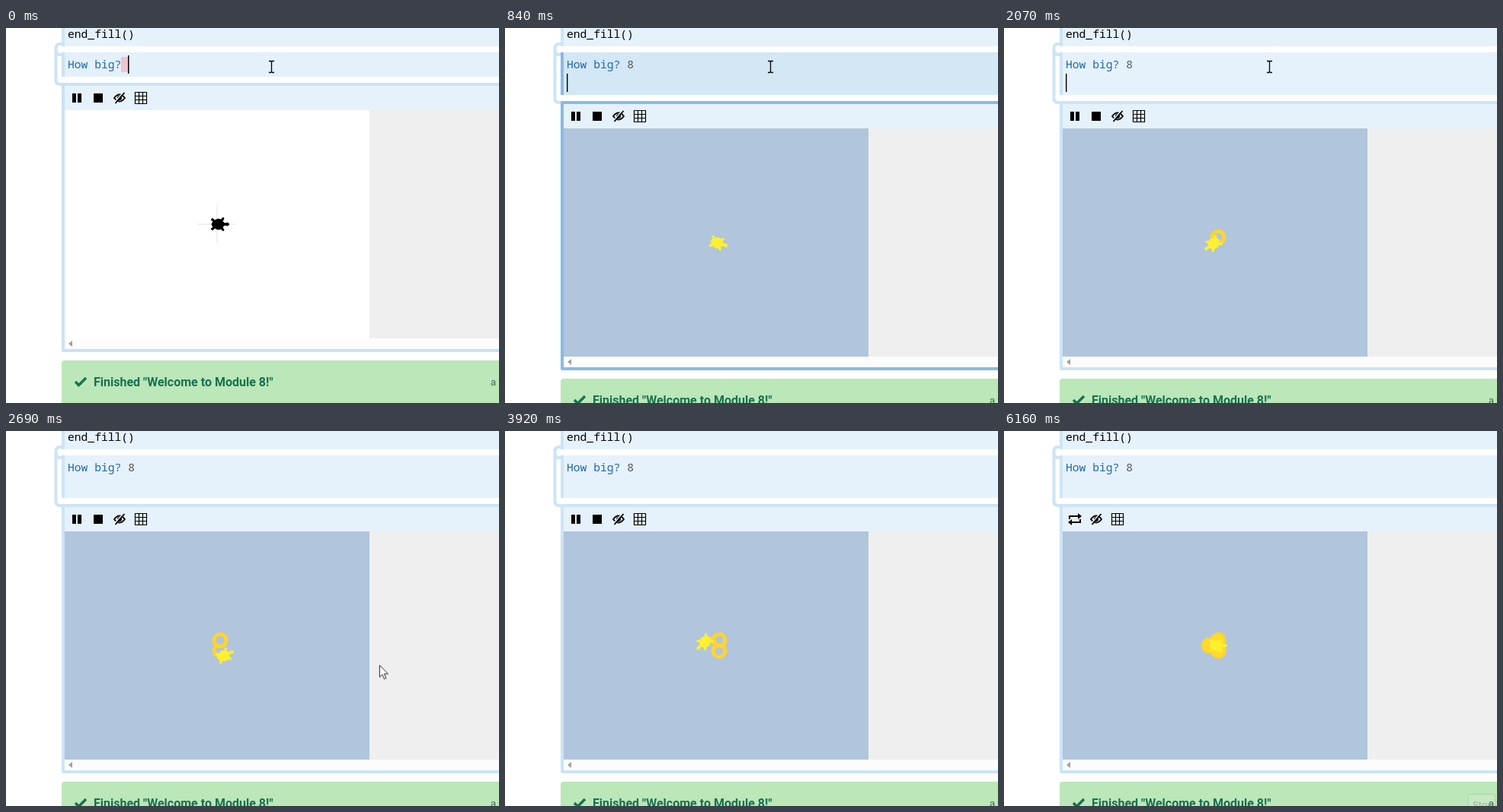
An HTML page that plays this animation: 647x493 px, repeating every 6230 ms.

```html
<!DOCTYPE html>
<html lang="en">
<head>
<meta charset="utf-8">
<title>Turtle flower</title>
<style>
html, body { margin: 0; width: 100%; height: 100%; overflow: hidden; background: #fff; }
svg { display: block; }
svg * { animation-duration: 6230ms; animation-iteration-count: infinite; animation-timing-function: linear; }
.mono { font: 14.65px "Noto Sans Mono", "DejaVu Sans Mono", monospace; }
.title { font: 700 16px Roboto, sans-serif; fill: #17714f; }
.small { font: 13px Roboto, sans-serif; fill: #3d6b50; }
.light { stroke: #cce4f6; stroke-width: 4; fill: none; }
.line { stroke: #000; fill: none; }

/* waiting-for-input pulse */
.field { fill: #e6f2fb; animation-name: field; animation-timing-function: ease-in-out; }
.edge { color: #cce4f6; animation-name: edge; animation-timing-function: ease-in-out; }
@keyframes field {
  0% { fill: #e4f0fa; } 1.93% { fill: #e6f2fb; }
  17.98% { fill: #cfe5f4; } 34.03%, 100% { fill: #e6f2fb; }
}
@keyframes edge {
  0% { color: #c9e2f5; } 1.93% { color: #cce4f6; }
  17.98% { color: #7ab2e5; } 34.03%, 100% { color: #cce4f6; }
}

/* hard switches */
.step { animation-timing-function: step-end; }
.space { animation-name: space; }
.caret1 { animation-name: caret1; }
.caret2 { animation-name: caret2; }
.digit { animation-name: digit; }
.lower { animation-name: drop; }
.sky { animation-name: sky; }
.skin { animation-name: skin; }
.cross { animation-name: cross; }
.fill { animation-name: filled; }
.run { animation-name: run; }
.again { animation-name: again; }
.tools { animation-name: tools; }
.beam { animation-name: beam; }
.arrow { animation-name: arrow; }
.tip { animation-name: tip; }
@keyframes space { 0% { opacity: 1; } 4.49%, 100% { opacity: 0; } }
@keyframes caret1 {
  0% { opacity: 1; transform: none; } 1.69% { opacity: 0; transform: none; }
  4.49% { opacity: 1; transform: translateX(9px); } 8.99%, 100% { opacity: 0; }
}
@keyframes caret2 {
  0% { opacity: 0; } 8.99% { opacity: 1; } 17.5% { opacity: 0; }
  26% { opacity: 1; } 33.6%, 100% { opacity: 0; }
}
@keyframes digit { 0% { opacity: 0; } 4.49%, 100% { opacity: 1; } }
@keyframes drop { 0% { transform: none; } 8.99%, 100% { transform: translateY(24px); } }
@keyframes sky { 0% { fill: #fff; } 13.32%, 100% { fill: #b1c5dd; } }
@keyframes skin { 0% { color: #000; } 13.32%, 100% { color: #fff02e; } }
@keyframes cross { 0% { opacity: 1; } 13.32%, 100% { opacity: 0; } }
@keyframes filled { 0% { opacity: 0; } 78.65%, 100% { opacity: 1; } }
@keyframes run { 0% { opacity: 1; } 79.78%, 100% { opacity: 0; } }
@keyframes again { 0% { opacity: 0; } 79.78%, 100% { opacity: 1; } }
@keyframes tools { 0% { transform: none; } 79.78%, 100% { transform: translateX(-28px); } }
@keyframes beam { 0% { opacity: 1; } 39.8%, 100% { opacity: 0; } }
@keyframes arrow { 0% { opacity: 0; } 39.8% { opacity: 1; } 51.4%, 100% { opacity: 0; } }
@keyframes tip { 0% { opacity: 0; } 97.75% { opacity: .5; } 98.7%, 100% { opacity: 1; } }

/* pointer path */
.pointer { animation-name: pointer; }
@keyframes pointer {
  0%, 39.8% { transform: translate(348px, 50px); }
  41.1% { transform: translate(418px, 169px); }
  42.2% { transform: translate(441px, 265px); }
  43.3% { transform: translate(495px, 312px); }
  45.4% { transform: translate(548px, 333px); }
  47.67% { transform: translate(569px, 372px); }
  49.76% { transform: translate(596px, 455px); }
  51.4%, 100% { transform: translate(625px, 500px); }
}

/* three circles of radius 8, each starting at home */
.trail { stroke: #ffd52d; stroke-width: 5; fill: none; stroke-dasharray: 1 2; stroke-dashoffset: 1; }
.c1 { animation-name: c1; }
.c2 { animation-name: c2; }
.c3 { animation-name: c3; }
@keyframes c1 {
  0%, 13.64% { stroke-dashoffset: 1; } 21.19% { stroke-dashoffset: .44; }
  30.34%, 100% { stroke-dashoffset: 0; }
}
@keyframes c2 { 0%, 32.91% { stroke-dashoffset: 1; } 54%, 100% { stroke-dashoffset: 0; } }
@keyframes c3 { 0%, 55.22% { stroke-dashoffset: 1; } 76.08%, 100% { stroke-dashoffset: 0; } }

.turn { animation-name: turn; }
.orbit { animation-name: orbit; transform-origin: 0 -8px; }
@keyframes turn {
  0%, 13.32% { transform: rotate(0deg); }
  13.64%, 30.34% { transform: rotate(30deg); }
  32.91%, 54% { transform: rotate(150deg); }
  55.22%, 76.08% { transform: rotate(270deg); }
  78.33%, 100% { transform: rotate(360deg); }
}
@keyframes orbit {
  0%, 13.64% { transform: rotate(0deg); }
  21.19% { transform: rotate(-201.6deg); }
  30.34% { transform: rotate(-360deg); }
  30.341%, 32.91% { transform: rotate(0deg); }
  54% { transform: rotate(-360deg); }
  54.001%, 55.22% { transform: rotate(0deg); }
  76.08% { transform: rotate(-360deg); }
  76.081%, 100% { transform: rotate(0deg); }
}
</style>
</head>
<body>
<svg width="647" height="493" viewBox="0 0 647 493">
  <defs>
    <path id="ring" pathLength="1" d="M0 0A8 8 0 0 0 0 -16A8 8 0 0 0 0 0"/>
    <circle id="disc" cy="-8" r="8"/>
  </defs>

  <!-- code cell and input -->
  <path fill="#e6f2fb" d="M77 0H647V24H77z"/>
  <path fill="#cce4f6" d="M73 0h4v24h-4z"/>
  <path class="light" d="M73 21H71Q65.500 21 65.500 27V88M73 35H71Q66 35 65.500 29"/>
  <path class="field" d="M77 32H647V88H77z"/>
  <g class="edge"><path fill="currentColor" d="M73 32h4v56h-4z"/></g>
  <text class="mono" x="81" y="13">end_fill()</text>
  <path class="step space" fill="#edc6cf" d="M151 38h9v20h-9z"/>
  <text class="mono" x="81" y="53" fill="#1f68a8">How big?</text>
  <text class="mono step digit" x="160.200" y="53" fill="#555">8</text>
  <path class="step caret1" d="M160 36h1.500v24h-1.500z"/>

  <g class="step lower">
    <path fill="#fff" d="M60 64H647V493H60z"/>
    <path class="light" d="M65.500 64V69Q65.500 74 71 74H74"/>
    <!-- output panel -->
    <g class="edge"><rect x="73" y="72" width="600" height="354" rx="2" fill="currentColor"/></g>
    <path fill="#e6f2fb" d="M77 76H647V108H77z"/>
    <path fill="#eeefee" d="M477 108H647V408H477z"/>
    <path fill="#fcfcfc" d="M77 408H647V422H77z"/>
    <path fill="#a0a09c" d="M82 415l5 -4v8z"/>
    <path class="step sky" d="M77 108H477V408H77z"/>

    <!-- toolbar -->
    <g class="step run">
      <path d="M87 86h5v12h-5zM94 86h5v12h-5zM115 86h12v12h-12z"/>
    </g>
    <g class="step again">
      <path class="line" stroke-width="2" d="M86 92V88H98M100 92V96H88"/>
      <path d="M97 84l5 4l-5 4zM89 92l-5 4l5 4z"/>
    </g>
    <g class="step tools">
      <path class="line" stroke-width="1.800" d="M142 92Q149 83 156 92Q149 101 142 92z"/>
      <circle cx="149" cy="92" r="3"/>
      <path stroke="#e6f2fb" stroke-width="1.500" d="M142.500 97.500L154 84.500"/>
      <path class="line" stroke-width="1.800" d="M143.500 99L155.500 85"/>
      <path class="line" stroke-width="1.200" d="M169.500 84.500h15v15h-15zM174.500 84.500v15M179.500 84.500v15M169.500 89.500h15M169.500 94.500h15"/>
    </g>

    <!-- drawing -->
    <g transform="translate(277 258)">
      <path class="step cross" stroke="#c8c8c8" stroke-dasharray="1 1" d="M-25 0H24M0 -25V24"/>
      <use href="#ring" class="trail c1" transform="rotate(30)"/>
      <use href="#ring" class="trail c2" transform="rotate(150)"/>
      <use href="#ring" class="trail c3" transform="rotate(270)"/>
      <g class="step fill" fill="#ffdb2f">
        <use href="#disc" transform="rotate(30)"/>
        <use href="#disc" transform="rotate(150)"/>
        <use href="#disc" transform="rotate(270)"/>
      </g>
      <g class="turn"><g class="orbit"><g class="step skin">
        <path fill="currentColor" stroke="currentColor" d="M16 0L14 -2L10 -1L7 -4L9 -7L8 -9L5 -6L1 -7L-3 -5L-6 -8L-8 -6L-5 -4L-7 0L-5 4L-8 6L-6 8L-3 5L1 7L5 6L8 9L9 7L7 4L10 1L14 2z"/>
      </g></g></g>
    </g>

    <!-- status bar -->
    <rect x="73" y="437" width="600" height="90" rx="4" fill="#bbe7b9"/>
    <path fill="none" stroke="#17714f" stroke-width="3.400" d="M91 465l4.500 4.500l9.500 -9.500"/>
    <text class="title" x="115" y="471">Finished "Welcome to Module 8!"</text>
    <text class="small" x="636" y="470">a few seconds ago</text>
  </g>

  <path class="step caret2" d="M81 60h1.400v24h-1.400z"/>

  <g class="step tip">
    <rect x="609.500" y="477.500" width="35" height="24" rx="1" fill="#c8e8c5" stroke="#abd3aa"/>
    <text class="small" x="615" y="496" style="fill:#8fb893">Stop</text>
    <text class="small" x="636" y="494">a</text>
  </g>

  <path class="line step beam" stroke-width="1.300" d="M345 43.500h2.500l1 1l1 -1h2.500M348.500 44.500v13M345 58.500h2.500l1 -1l1 1h2.500"/>
  <g class="pointer"><path class="step arrow" fill="#fff" stroke="#223" d="M.5 .5V16L4 12.700L6.500 18.500L9 17.400L6.500 11.800H11.500z"/></g>
</svg>
</body>
</html>
```
